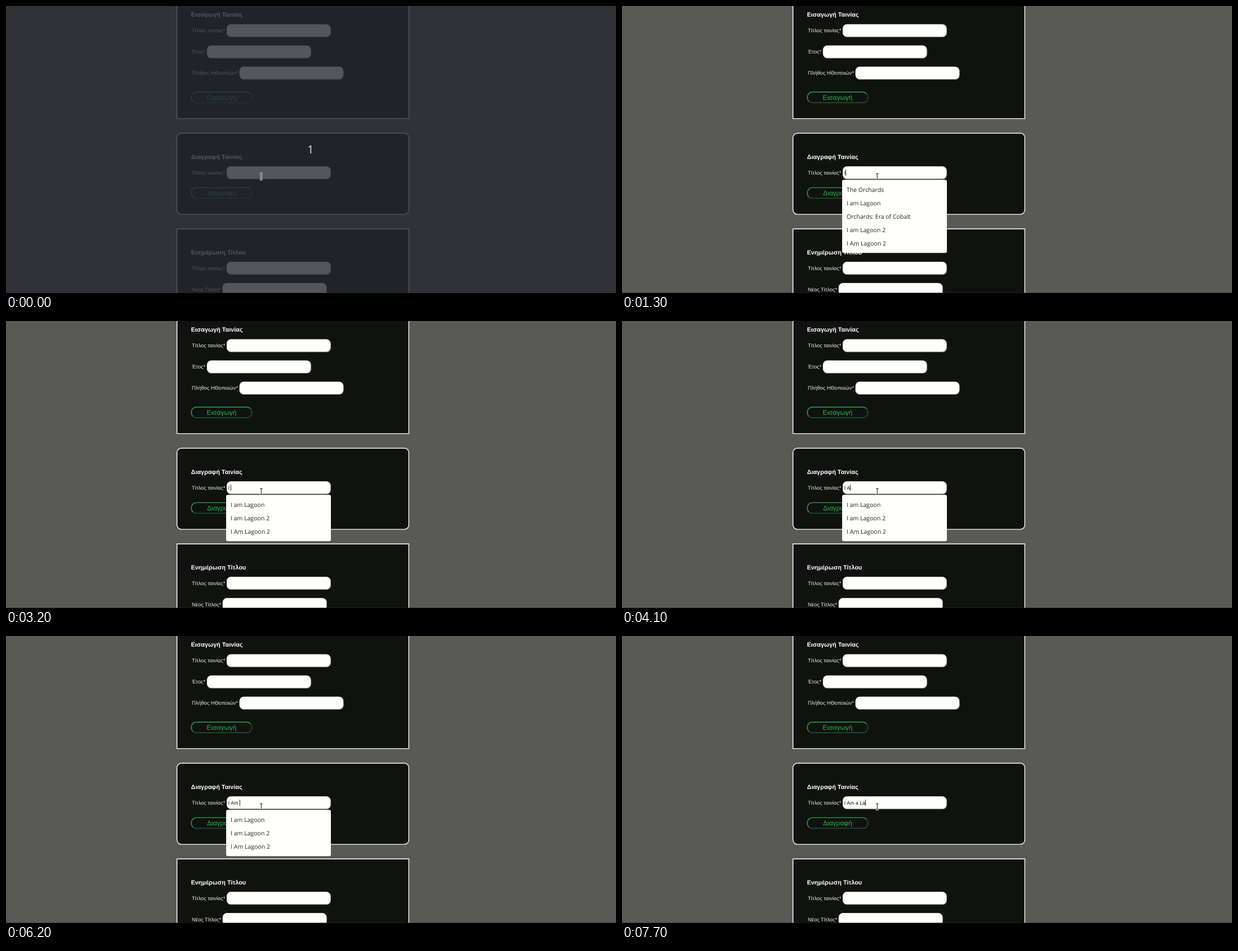
Animation, 1089 px wide and 514 px high, one loop 8000 ms. Source, as an HTML page with a canvas:

```html
<!DOCTYPE html>
<html lang="el">
<head>
<meta charset="utf-8">
<title>Φόρμα ταινιών</title>
<style>
  html, body { margin: 0; width: 100%; height: 100%; overflow: hidden; background: #5a5a55; }
  canvas { display: block; width: 1089px; height: 514px; }
</style>
</head>
<body>
<canvas id="stage" width="1089" height="514"></canvas>
<script>
const ctx = document.getElementById('stage').getContext('2d');
const W = 1089, H = 514, LOOP = 8000;
const SANS = '"Liberation Sans", Arial, sans-serif';
const MENU = '"Open Sans", "Noto Sans", sans-serif';
const PAPER = '#fffffc', INK = '#101210';
const FIELD_X = 396.8;

const titles = ['The Orchards', 'I am Lagoon', 'Orchards: Era of Cobalt', 'I am Lagoon 2', 'I Am Lagoon 2'];

// start time, field text, caret visible
const typing = [
  [0, '', 0], [1300, 'I', 1], [1900, 'I', 0],
  [2200, 'I ', 1], [2600, 'I ', 0], [3200, 'I ', 1], [3800, 'I ', 0],
  [4100, 'I A', 1], [4700, 'I A', 0], [5300, 'I A', 1],
  [5400, 'I Am', 1], [5700, 'I A', 1], [5900, 'I A', 0],
  [6100, 'I Am', 1], [6200, 'I Am ', 1], [6700, 'I Am a', 1],
  [6900, 'I Am a ', 1], [7200, 'I Am a L', 1], [7700, 'I Am a La', 1]
];

function rounded(x, y, w, h, r) {
  ctx.beginPath();
  ctx.roundRect(x, y, w, h, r);
}

function text(str, x, y, font, color, align = 'left') {
  ctx.font = font;
  ctx.fillStyle = color;
  ctx.textAlign = align;
  ctx.fillText(str, x, y);
}

function panel(y, h, r) {
  rounded(305.3, y, 413.8, h, r);
  ctx.fillStyle = INK;
  ctx.fill();
  ctx.strokeStyle = '#fff';
  ctx.lineWidth = 1.4;
  ctx.stroke();
}

function heading(str, y) {
  text(str, 330.3, y, `bold 10.9px ${SANS}`, '#fff');
}

function field(label, x, y) {
  text(label, 331.8, y + 14.6, `9.33px ${SANS}`, '#f0f0ee');
  rounded(x, y, 186, 23, 7.5);
  ctx.fillStyle = '#a9aaa8';
  ctx.fill();
  rounded(x, y, 185, 21.9, 7.5);
  ctx.fillStyle = PAPER;
  ctx.fill();
}

function button(label, y) {
  const x = 331, w = 107.8, h = 19, m = h / 2;
  ctx.lineWidth = 1.4;
  rounded(x, y, w, h, 8.5);
  ctx.strokeStyle = '#17622c';
  ctx.stroke();
  // lit top and left edges
  ctx.save();
  ctx.beginPath();
  ctx.moveTo(x - 1, y - 1);
  ctx.lineTo(x + w + 1, y - 1);
  ctx.lineTo(x + w - m, y + m);
  ctx.lineTo(x + m, y + m);
  ctx.lineTo(x - 1, y + h + 1);
  ctx.clip();
  rounded(x, y, w, h, 8.5);
  ctx.strokeStyle = '#28a745';
  ctx.stroke();
  ctx.restore();
  text(label, x + w / 2, y + 13.2, `12px ${SANS}`, '#2bb74b', 'center');
}

function page() {
  ctx.fillStyle = '#5a5a55';
  ctx.fillRect(0, 0, W, H);

  panel(-60, 261.6, 0);
  heading('Εισαγωγή Ταινίας', 18.8);
  field('Τίτλος ταινίας*', 394, 32.8);
  field('Έτος*', 358.8, 70.8);
  field('Πλήθος ΗΘοποιών*', 416.8, 108.8);
  button('Εισαγωγή', 154.3);

  panel(227.7, 145.4, 8);
  heading('Διαγραφή Ταινίας', 273.8);
  field('Τίτλος ταινίας*', 394, 287.2);
  button('Διαγραφή', 325.4);

  panel(399.2, 180, 0);
  heading('Ενημέρωση Τίτλου', 444.8);
  field('Τίτλος ταινίας*', 394, 458.2);
  field('Νέος Τίτλος*', 386.8, 496.2);
}

function typed(t) {
  const [, str, caret] = typing.findLast(step => t >= step[0]);
  text(str, FIELD_X, 301.7, `8.89px ${SANS}`, '#111');
  if (caret) {
    ctx.fillStyle = '#222';
    ctx.fillRect(Math.floor(FIELD_X + ctx.measureText(str).width), 293, 1, 11);
  }
}

function menu(t) {
  if (t < 1300 || t >= 6900) return;
  const fading = t >= 6800;
  const items = t < 1400 ? titles : titles.filter(s => s.startsWith('I'));
  const h = 11 + 24 * items.length;
  ctx.save();
  if (fading) {
    const cx = 486.5, cy = 311 + h / 2;
    ctx.translate(cx, cy);
    ctx.scale(0.982, 0.982);
    ctx.translate(-cx, -cy);
    ctx.globalAlpha = 0.66;
  }
  rounded(393, 311.3, 187, h, 3);
  ctx.fillStyle = PAPER;
  ctx.fill();
  if (fading) ctx.globalAlpha = 0.92;
  items.forEach((s, i) => text(s, 401, 332.8 + 24 * i, `500 10.6px ${MENU}`, '#222'));
  ctx.restore();
}

function pointer() {
  const x = 455.7;
  for (const [width, color] of [[2.8, '#fff'], [1.1, '#1b1b1b']]) {
    ctx.beginPath();
    ctx.moveTo(x - 2.4, 300.2);
    ctx.lineTo(x + 2.4, 300.2);
    ctx.moveTo(x, 300.2);
    ctx.lineTo(x, 310.8);
    ctx.moveTo(x - 2.4, 310.8);
    ctx.lineTo(x + 2.4, 310.8);
    ctx.lineWidth = width;
    ctx.strokeStyle = color;
    ctx.stroke();
  }
}

function countdown() {
  ctx.fillStyle = 'rgba(37, 40, 49, 0.783)';
  ctx.fillRect(0, 0, W, H);
  text('1', 543.8, 264.3, `20px ${MENU}`, '#e4e4e6', 'center');
}

function draw(t) {
  page();
  typed(t);
  menu(t);
  if (t < 400) countdown();
  pointer();
  ctx.fillStyle = 'rgba(45, 42, 42, 0.5)';
  ctx.fillRect(0, H - 1, W, 1);
}

ctx.textRendering = 'geometricPrecision';
const start = performance.now();
function tick() {
  draw((performance.now() - start) % LOOP);
  requestAnimationFrame(tick);
}
tick();
</script>
</body>
</html>
```
